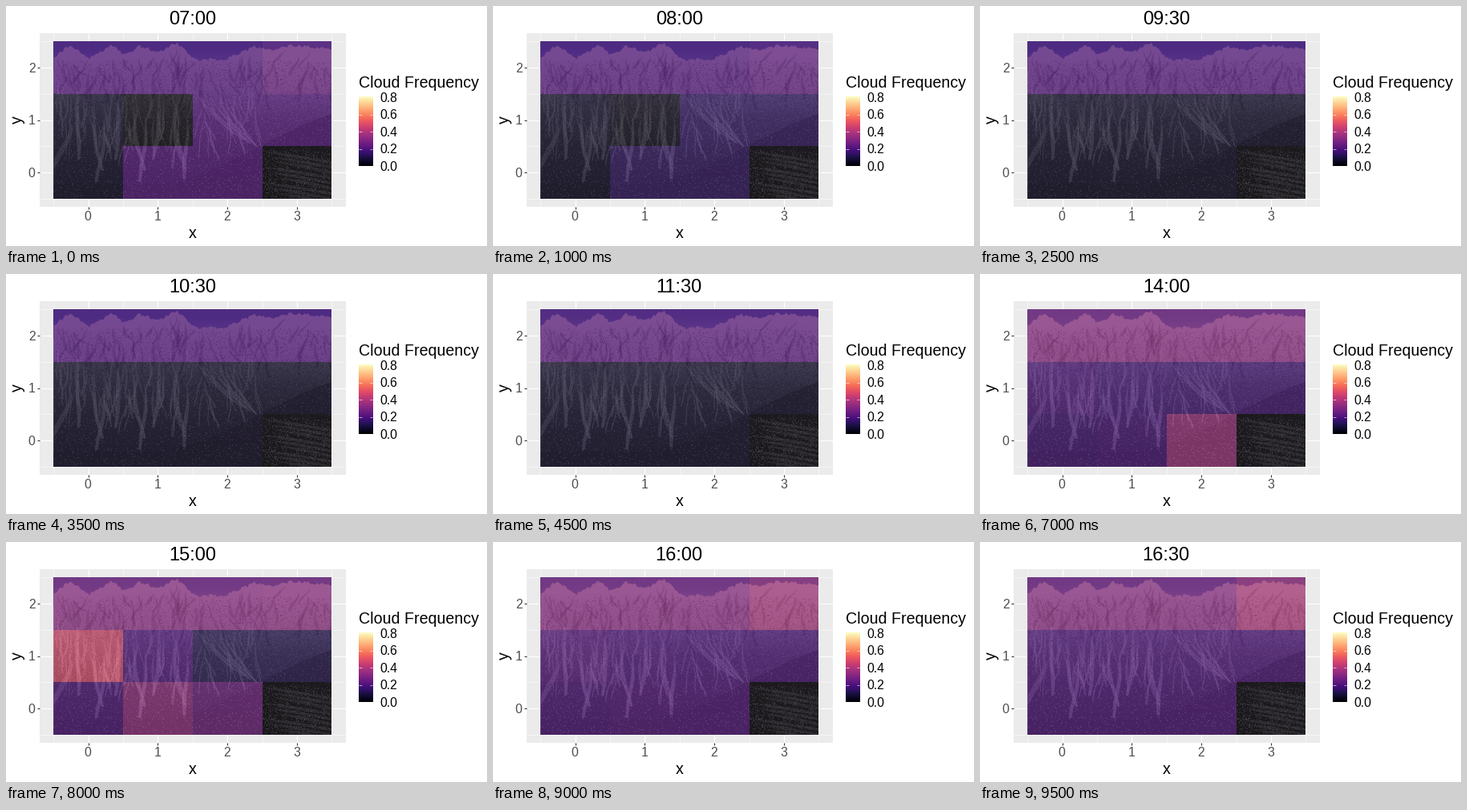
Recreate the animation shown at these times as a matplotlib script. Size 600 by 300 pixels, loop 10 s.

```python
import numpy as np
import matplotlib.pyplot as plt
from matplotlib.animation import FuncAnimation
from matplotlib.patches import Polygon, Rectangle

W, H, DPI = 600, 300, 100
PX = 72 / DPI  # points per pixel
FRAMES, INTERVAL = 20, 500
LEFT, RIGHT, TOP, BOTTOM = 59.4, 406.2, 44, 241
ROWS, COLS = 3, 4
TILE_W, TILE_H = (RIGHT - LEFT) / COLS, (BOTTOM - TOP) / ROWS
ALPHA = 0.6
magma = plt.colormaps["magma"]
rng = np.random.default_rng(11)

# Passing local clouds: hour, row from the top, column, strength, spread in hours
PUFFS = [(7, 1, 1, -0.08, 1.0), (14, 2, 2, 0.24, 1.0), (15, 1, 0, 0.36, 0.6),
         (15, 2, 1, 0.18, 0.6), (16.5, 0, 3, 0.10, 1.0)]


def smoothstep(x, start, end):
    t = np.clip((x - start) / (end - start), 0, 1)
    return t * t * (3 - 2 * t)


def cloud_levels(hour):
    """Position on the colour scale for every tile, top row first."""
    row, col = np.indices((ROWS, COLS))
    summit = 0.26 + 0.15 * smoothstep(hour, 11, 13)
    slopes = 0.06 + 0.18 * smoothstep(hour, 11, 15)
    levels = np.where(row == 0, summit, slopes)
    # Morning fog lies across the lower right and lifts
    fog = np.where(row == 0, 0.06, 0.19) * (row + col >= 3)
    levels += fog * np.exp(-((hour - 7) / 1.3) ** 2)
    # Shade on the right of the middle row in mid-afternoon
    levels -= 0.11 * ((row == 1) & (col >= 2)) * np.exp(-((hour - 15) / 0.6) ** 2)
    for peak, r, c, strength, spread in PUFFS:
        levels[r, c] += strength * np.exp(-((hour - peak) / spread) ** 2)
    levels[-1, -1] = 0
    return np.clip(levels, 0, 1)


def rgb(r, g, b):
    return r / 255, g / 255, b / 255


def label(x, y, text, px, color="black", va="baseline", **kw):
    return ax.text(x, y, text, fontsize=0.985 * px * PX, color=color,
                   family="Liberation Sans", va=va, **kw)


def line(x0, y0, x1, y1, color, px, z):
    ax.plot([x0, x1], [y0, y1], color=color, lw=px * PX, zorder=z,
            solid_capstyle="butt")


def shape(points, color, alpha=1.0, z=4):
    patch = Polygon(points, closed=True, fc=color, ec="none", alpha=alpha, zorder=z)
    ax.add_patch(patch)
    patch.set_clip_path(frame)
    return patch


def streak(x, y, dx, dy, width, color, alpha):
    """Curved sliver that is narrow at the top and widens downhill."""
    t = np.linspace(0, 1, 9)
    cx = x + dx * t ** 1.4 + 1.2 * np.sin(7 * t + x)
    cy = y + dy * t
    half = width * (0.15 + 0.85 * np.sin(np.pi * t * 0.8)) / 2
    left, right = np.c_[cx - half, cy], np.c_[cx + half, cy]
    shape(np.r_[left, right[::-1]], color, alpha, z=5)


def speckle(count, x0, y0, color, alpha):
    x = rng.uniform(x0, RIGHT - 1, count)
    y = rng.uniform(y0, BOTTOM - 1, count)
    ax.scatter(x, y, s=PX ** 2, c=[color], marker="s", lw=0, alpha=alpha, zorder=6)


def gradient(colors, extent, z):
    return ax.imshow(np.array(colors)[:, None], extent=extent, aspect="auto",
                     interpolation="bilinear", zorder=z)


def draw_panel():
    ax.add_patch(Rectangle((42, 34), 381.5, 217, fc="#EBEBEB", ec="none"))
    for k in range(COLS + 1):
        x = LEFT + k * TILE_W
        line(x, 34, x, 251, "white", 0.55, 1)
    for k in range(ROWS + 1):
        y = TOP + k * TILE_H
        line(42, y, 423.5, y, "white", 0.55, 1)
    for k in range(COLS):
        x = LEFT + (k + 0.5) * TILE_W
        line(x, 34, x, 251, "white", 1.1, 2)
        line(x, 251, x, 253.8, "#333333", 1.1, 2)
        label(x - 0.5, 268, str(k), 16, "#4D4D4D", ha="center")
    for k in range(ROWS):
        y = BOTTOM - (k + 0.5) * TILE_H
        line(42, y, 423.5, y, "white", 1.1, 2)
        line(39.2, y, 42, y, "#333333", 1.1, 2)
        label(36.5, y + 5.7, str(k), 16, "#4D4D4D", ha="right")
    label(232.5, 290, "x", 20, ha="center")
    label(24.3, 142.5, "y", 20, ha="right", va="center", rotation=90)


def draw_legend():
    label(440, 102, "Cloud Frequency", 20)
    gradient(magma(np.linspace(1, 0, 256)), (440, 457.3, 200.4, 114), 3)
    for k in range(5):
        y = 200.2 - k * 21.5
        line(440, y, 443.5, y, "white", 0.6, 4)
        line(453.8, y, 457.3, y, "white", 0.6, 4)
        label(466.6, y + 5.7, f"{k * 0.2:.1f}", 16)


def ridge_line(xs):
    """Crest through the main peaks and saddles, roughened by noise."""
    peaks = np.array([(59, 66), (79, 49), (104, 65), (133, 49), (148, 62), (167, 50),
                      (190, 59), (212, 46), (236, 67), (272, 67), (310, 51), (330, 56),
                      (357, 49), (406, 54)])
    return np.interp(xs, *peaks.T) + rng.uniform(-2, 2, xs.size)


def draw_mountains():
    dark, snow = rgb(58, 54, 62), rgb(192, 184, 194)
    gradient([rgb(70, 80, 138), rgb(92, 100, 150)], (LEFT, RIGHT, 80, TOP), 3)

    xs = np.linspace(LEFT, RIGHT, 156)
    ridge = ridge_line(xs)
    massif = shape(np.r_[np.c_[xs, ridge], [[RIGHT, BOTTOM], [LEFT, BOTTOM]]], "none")
    face = gradient([rgb(168, 156, 176), rgb(146, 136, 154), rgb(102, 97, 106),
                     rgb(82, 78, 84), rgb(72, 68, 72)],
                    (LEFT, RIGHT, BOTTOM, TOP), 3.5)
    face.set_clip_path(massif)

    # Rock spurs below the crest, then snow gullies between them
    for _ in range(90):
        x = rng.uniform(LEFT, RIGHT)
        y = np.interp(x, xs, ridge) + rng.uniform(4, 40)
        streak(x, y, rng.uniform(-16, 16), rng.uniform(14, 40),
               rng.uniform(1.5, 5), dark, 0.3)
    for _ in range(100):
        streak(rng.uniform(LEFT, 315), rng.uniform(90, 155), rng.uniform(-13, 15),
               rng.uniform(25, 60), rng.uniform(1, 2.8), snow, 0.5)
    for k in range(9):
        streak(90 + 17 * k, 112 + 14 * (k % 3), 14 * np.sin(2 * k), 80, 5, snow, 0.55)
    for k in range(5):
        streak(238 + 9 * k, 108 + 2 * k, 60 - 5 * k, 60, 4, snow, 0.5)
    shape([(LEFT, 192), (88, 142), (78, 172), (LEFT, 205)], snow, 0.4)

    # Foreground slope rising to the right, banded with snow
    t = np.linspace(0, 1, 20)
    slope = np.c_[LEFT + (RIGHT - LEFT) * t, 222 - 96 * smoothstep(t, 0.35, 1.15)]
    shape(np.r_[slope, [[RIGHT, BOTTOM], [LEFT, BOTTOM]]], rgb(66, 61, 63), 0.65, z=5.2)
    for k in range(9):
        x, y = 322 + 7 * (k % 3), 182 + 6.5 * k
        shape([(x, y), (x + 34, y + 3), (RIGHT, y + 12), (RIGHT, y + 15), (x + 28, y + 6)],
              snow, 0.35, z=5.4)

    speckle(5000, LEFT, 68, dark, 0.5)
    speckle(3000, LEFT, 95, snow, 0.5)
    speckle(700, 320, 180, snow, 0.6)


def tile_colors(i):
    return magma(cloud_levels(7 + i / 2), alpha=ALPHA)


def update(i):
    tiles.set_array(tile_colors(i))
    title.set_text(f"{7 + i // 2:02d}:{i % 2 * 30:02d}")
    return tiles, title


fig = plt.figure(figsize=(W / DPI, H / DPI), dpi=DPI, facecolor="white")
ax = fig.add_axes([0, 0, 1, 1])
ax.axis("off")
frame = Rectangle((LEFT, TOP), RIGHT - LEFT, BOTTOM - TOP, fc="none", ec="none")
ax.add_patch(frame)

draw_panel()
draw_legend()
draw_mountains()
tiles = ax.pcolormesh(np.rint(np.linspace(LEFT, RIGHT, COLS + 1)),
                      np.rint(np.linspace(TOP, BOTTOM, ROWS + 1)),
                      tile_colors(0), antialiased=False, linewidth=0, zorder=8)
title = label(232.3, 23, "07:00", 24, ha="center")
ax.set(xlim=(0, W), ylim=(H, 0))

anim = FuncAnimation(fig, update, frames=FRAMES, interval=INTERVAL, repeat=True,
                     repeat_delay=0, blit=False)
plt.show()
```
